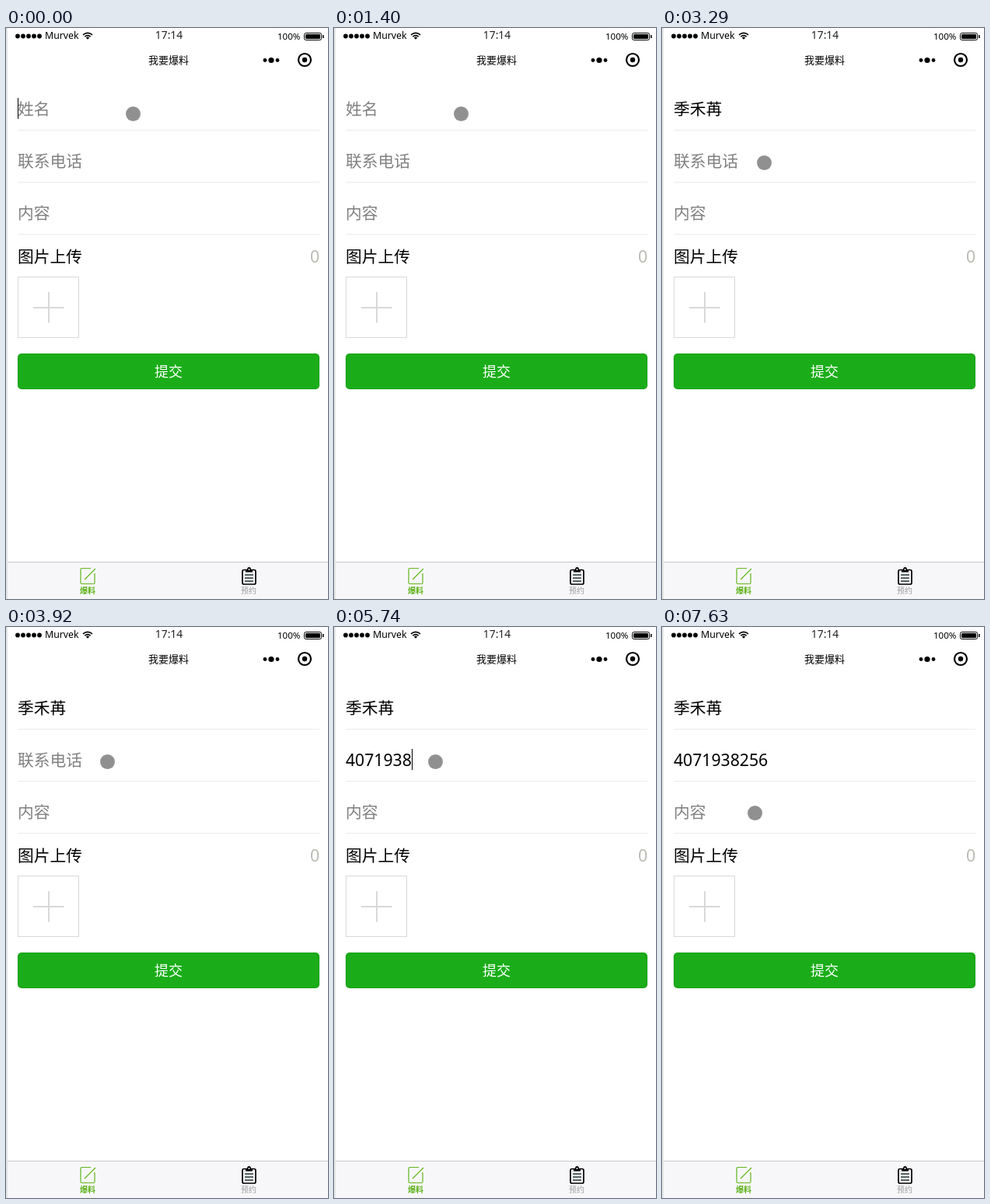
These frames come from a looping animation (414 by 735 pixels, 8000 ms). An HTML page:

```html
<!DOCTYPE html>
<html lang="zh-CN">
<head>
<meta charset="utf-8">
<title>Form</title>
<style>
  html, body { margin: 0; width: 100%; height: 100%; overflow: hidden; background: #fff; }
  svg { display: block; width: 414px; height: 735px; }
  text { font-family: "Noto Sans CJK SC", "Noto Sans CJK", sans-serif; font-weight: 350; }
  .latin { font-family: "Noto Sans", "Open Sans", sans-serif; font-weight: 400; }
  .field { font-size: 20.75px; }
  .field.latin { font-size: 21.2px; }
  .line { fill: none; stroke: #000; }
</style>
</head>
<body>
<svg viewBox="0 0 414 735">
  <rect width="414" height="735" fill="#fff"/>

  <!-- status bar -->
  <g id="signal"></g>
  <text class="latin" x="50" y="14" font-size="12.3">Murvek</text>
  <path class="line" stroke-width="1.7" d="M99 8.8Q105 3.8 111 8.8M101.3 11.2Q105 8.2 108.7 11.2"/>
  <path d="M102.8 12.4Q105 10.8 107.2 12.4L105 14.8Z"/>
  <text class="latin" x="209.5" y="14" font-size="13.8" text-anchor="middle" fill="#222">17:14</text>
  <text class="latin" x="378.5" y="15" font-size="11.6" text-anchor="end">100%</text>
  <rect class="line" x="383.5" y="6.5" width="22" height="9" rx="2"/>
  <rect x="385" y="8" width="19" height="6" rx="1"/>
  <rect x="407" y="9" width="1.5" height="4"/>

  <!-- title bar -->
  <text x="209" y="46" font-size="13" text-anchor="middle">我要爆料</text>
  <circle cx="333" cy="41.5" r="2.4"/>
  <circle cx="341" cy="41.5" r="3.6"/>
  <circle cx="349" cy="41.5" r="2.4"/>
  <circle class="line" cx="384" cy="41" r="8" stroke-width="2.2"/>
  <circle cx="384" cy="41" r="3.2"/>

  <!-- form -->
  <g id="fields"></g>
  <path class="line" style="stroke:#ebebeb" d="M15 131.5H403M15 198.5H403M15 265.5H403"/>
  <text class="field" x="15" y="302">图片上传</text>
  <text class="field latin" x="403" y="302" text-anchor="end" fill="#b9bab0">0</text>
  <rect class="line" style="stroke:#d9d9d9" x="15.5" y="320.5" width="78" height="78"/>
  <path class="line" style="stroke:#d9d9d9" stroke-width="2" d="M35 360H74.5M55 340V379.5"/>
  <rect x="15" y="419" width="388" height="46" rx="5" fill="#1aad19"/>
  <rect class="line" x="15.5" y="419.5" width="387" height="45" rx="4.5" stroke-opacity=".08"/>
  <text x="209" y="449" font-size="18" text-anchor="middle" fill="#fff">提交</text>

  <!-- tab bar -->
  <rect y="687" width="414" height="48" fill="#f7f7fa"/>
  <path class="line" style="stroke:#c9c9c9" d="M0 687.5H414"/>
  <path class="line" style="stroke:#62b51c" stroke-width="1.2"
    d="M109 695.5H97.5Q96 695.5 96 697V714Q96 715.5 97.5 715.5H112.5Q114 715.5 114 714V702M101 710L115 696"/>
  <text x="105" y="728" font-size="10" style="font-weight:bold" text-anchor="middle" fill="#5bb014">爆料</text>
  <rect class="line" x="304" y="697.5" width="17" height="18.5" rx="2" stroke-width="1.7"/>
  <path d="M308 700.5V697H310Q310 694 312.5 694T315 697H317V700.5Z"/>
  <circle cx="312.5" cy="697" r="1" fill="#fff"/>
  <path class="line" style="stroke:#233" stroke-width="1.3" d="M307 704H318M307 708H318M307 712H318"/>
  <text x="312" y="728" font-size="10" text-anchor="middle" fill="#999">预约</text>
  <rect width="2" height="735" fill="#e2e2e2"/>

  <rect id="caret" width="1" height="27"/>
  <circle id="pointer" r="9.5" fill="#000" fill-opacity=".435"/>
</svg>
<script>
const LOOP = 8000, TICK = 70, BLINK = 490, LEFT = 15;
const NAME = "季禾苒", PHONE = "4071938256";
const placeholders = ["姓名", "联系电话", "内容"];

// [time, focused field, its text]; each edit restarts the caret blink
const edits = [
  [0, 0, ""], [140, 0, "j"], [420, 0, "ji"], [770, 0, "j"], [910, 0, ""], [2520, 0, NAME],
  [3430, 1, ""],
  ...[4060, 4200, 4340, 5110, 5250, 5390, 5740, 5880, 6090, 6230]
    .map((time, i) => [time, 1, PHONE.slice(0, i + 1)]),
  [7070, 2, ""], [7140, 2, ""]
];

// [time, x, y]
const pointerPath = [
  [0, 163.5, 110.5], [2870, 163.5, 110.5], [3290, 131.5, 173.5], [3360, 130.5, 173.5],
  [6580, 130.5, 173.5], [6650, 130.5, 197.5], [6720, 122.5, 229.5], [6790, 119.5, 239.5],
  [LOOP, 119.5, 239.5]
];

const byId = id => document.getElementById(id);
const caret = byId("caret"), pointer = byId("pointer");

function add(parent, tag, attributes) {
  const node = document.createElementNS("http://www.w3.org/2000/svg", tag);
  for (const key in attributes) node.setAttribute(key, attributes[key]);
  return byId(parent).appendChild(node);
}

for (let i = 0; i < 5; i++) add("signal", "circle", { cx: 15 + 7 * i, cy: 10.5, r: 2.9 });
const fields = placeholders.map((_, i) => add("fields", "text", { x: LEFT, y: 112 + 67 * i }));

function textWidth(text) {
  const advance = /\d/.test(text) ? 12.14 : /[a-z]/.test(text) ? 5.6 : 20.75;
  return text.length * advance;
}

function pointerAt(time) {
  const next = Math.max(1, pointerPath.findIndex(key => key[0] > time));
  const [t0, x0, y0] = pointerPath[next - 1], [t1, x1, y1] = pointerPath[next];
  const u = (time - t0) / (t1 - t0), ease = u * u * (3 - 2 * u);
  return [x0 + (x1 - x0) * ease, y0 + (y1 - y0) * ease];
}

function draw(time) {
  const t = Math.floor(time / TICK) * TICK;
  const values = ["", "", ""];
  let since, focus;
  for (const [start, field, text] of edits) {
    if (start > t) break;
    values[field] = text;
    since = start;
    focus = field;
  }
  fields.forEach((node, i) => {
    const value = values[i];
    node.textContent = value || placeholders[i];
    node.setAttribute("fill", value ? "#000" : "#808080");
    node.setAttribute("class", /^\w/.test(value) ? "field latin" : "field");
  });
  caret.setAttribute("x", Math.round(LEFT + textWidth(values[focus])));
  caret.setAttribute("y", 90 + 67 * focus);
  caret.setAttribute("visibility", Math.floor((t - since) / BLINK) % 2 ? "hidden" : "visible");

  const [x, y] = pointerAt(t);
  pointer.setAttribute("cx", x);
  pointer.setAttribute("cy", y);
}

function frame() {
  draw(performance.now() % LOOP);
  requestAnimationFrame(frame);
}
frame();
</script>
</body>
</html>
```
